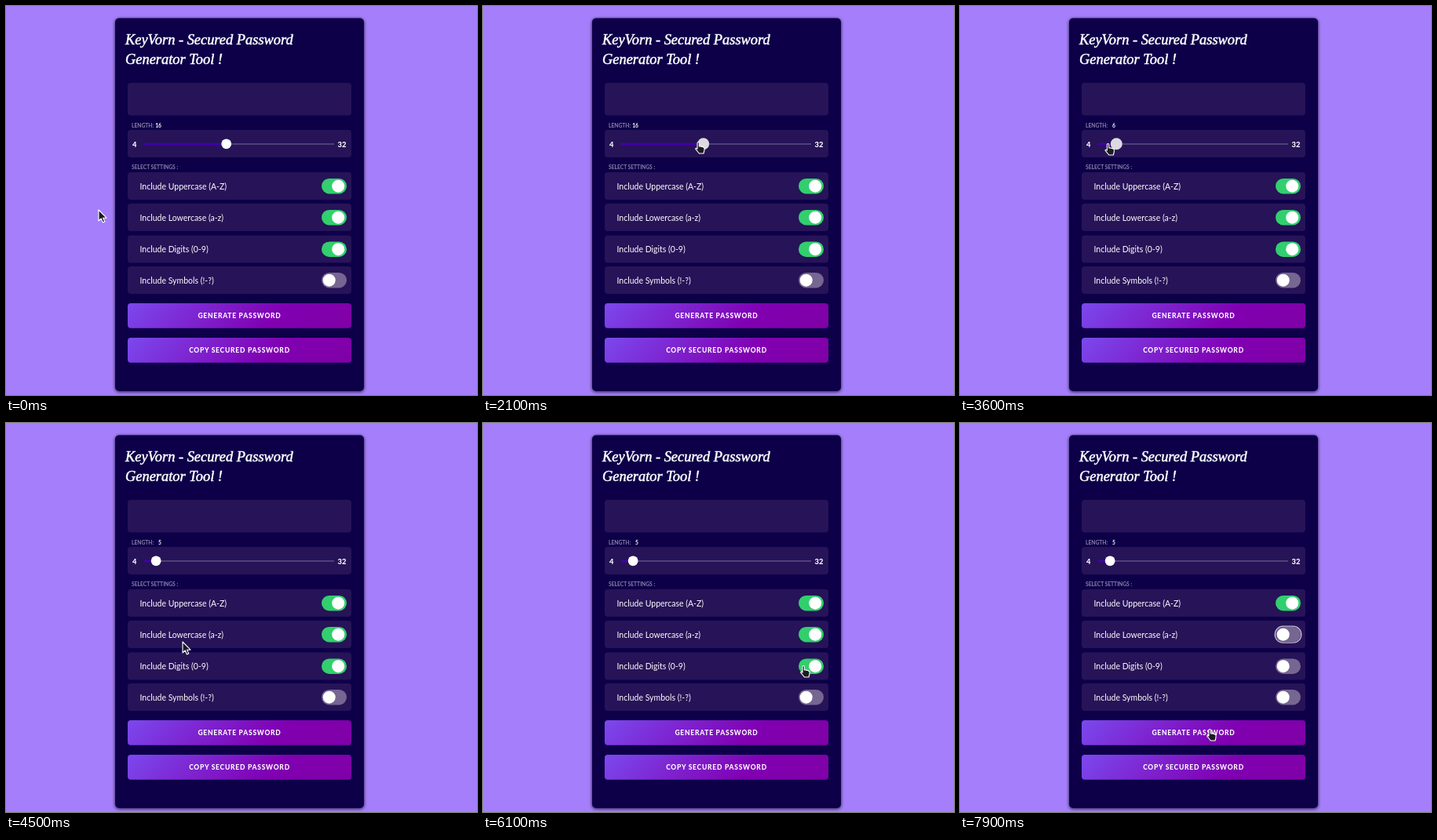
Animation, 600 px wide and 496 px high, one loop 8 s. Source, as an HTML page:

```html
<!DOCTYPE html>
<html lang="en">
<meta charset="utf-8">
<title>Password generator</title>
<style>
html, body { margin: 0; width: 100%; height: 100%; overflow: hidden; background: #a57ffb }
svg { display: block; width: 600px; height: 496px }
text { fill: #fff; font-family: Lato, "Open Sans", sans-serif; white-space: pre }
.title { font: italic 18.4px "Liberation Serif", serif; stroke: #fff; stroke-width: .5 }
.small { font-size: 6.7px; font-weight: 700; fill: #8d80a8 }
.label { font-size: 10.5px }
.bold { font-size: 9.3px; font-weight: 800 }
.button { font-size: 8.5px; font-weight: 800; letter-spacing: .75px; text-anchor: middle }
.panel { fill: #271358 }
.pointer { fill: #1c1c22; stroke: #fff; stroke-width: 1.1; stroke-linejoin: round }
</style>
<svg viewBox="0 0 600 496">
  <defs>
    <linearGradient id="violet" gradientUnits="userSpaceOnUse" x1="155" y1="0" x2="313.5" y2="158.5">
      <stop stop-color="#7b49ee"/><stop offset=".65" stop-color="#8000b2"/><stop offset="1" stop-color="#8000a6"/>
    </linearGradient>
    <filter id="shadow" x="-5%" y="-5%" width="110%" height="110%">
      <feDropShadow dx="0" dy="1" stdDeviation="2" flood-color="#000" flood-opacity=".8"/>
    </filter>
  </defs>
  <rect width="600" height="496" fill="#a57ffb"/>
  <rect x="139" y="15.5" width="317" height="475.5" rx="5" fill="#10004a" filter="url(#shadow)"/>
  <text class="title" x="152" y="49">KeyVorn - Secured Password</text>
  <text class="title" x="152" y="74">Generator Tool !</text>
  <rect class="panel" x="155" y="98" width="285" height="41.5" rx="4"/>
  <text class="small" x="160" y="154.5">LENGTH:</text>
  <text class="small" id="length" x="198" y="154.5" text-anchor="end" style="fill:#fff"></text>
  <rect class="panel" x="155" y="158" width="285" height="35" rx="4"/>
  <text class="bold" x="161" y="179.8">4</text>
  <text class="bold" x="422.5" y="179.8">32</text>
  <rect x="176" y="175.2" width="242" height="1.6" fill="#5b4a80"/>
  <rect id="fill" x="176" y="174.8" height="2.4" rx="1" fill="#4300ae"/>
  <circle id="thumb" cy="175.8"/>
  <text class="small" x="160" y="208.3">SELECT SETTINGS :</text>
  <g id="rows"></g>
  <g id="buttons"></g>
  <path id="arrow" class="pointer" d="M0 0V14L3.2 11L5.4 16L7.8 15L5.6 10.2H10Z"/>
  <path id="hand" class="pointer" d="M-1 0C-1-2 1.4-2 1.4 0V4L3.6 3.7L4.2 4.5L6 4.3L6.6 5.2L8 5.4V9L7 13H1.4L-3.2 7.4C-3.4 6-2.2 5.8-1 7.2Z"/>
</svg>
<script>
const $ = id => document.getElementById(id);
const clamp = x => Math.max(0, Math.min(1, x));
const mix = (a, b, p) => a + (b - a) * p;
const LOOP = 8000, FRAME = 100;

// label, top edge, switch-off time, time at which the focus ring goes
const settings = [
  ['Include Uppercase (A-Z)', 212],
  ['Include Lowercase (a-z)', 252, 7000, LOOP],
  ['Include Digits (0-9)', 292.5, 6200, 7000],
  ['Include Symbols (!-?)', 332, -1000, -1000]
];
// time, x, y of the pointer tip
const path = [
  [0, 118, 260], [700, 118, 260], [1400, 211, 181], [1900, 274, 175], [2200, 274, 175],
  [2800, 199, 178], [3400, 191, 177], [4000, 183, 177], [4100, 183, 177], [4500, 225, 279],
  [4700, 226, 281], [5600, 416, 302], [5800, 408, 311], [6200, 408, 311], [6600, 416, 274],
  [6800, 416, 270], [7000, 416, 270], [7700, 319, 390], [7900, 318, 392], [LOOP, 318, 392]
];
// value shown until the given time
const steps = [[2300, 16], [2400, 14], [2500, 12], [2600, 10], [2700, 8], [3500, 7], [3700, 6], [LOOP, 5]];

$('rows').innerHTML = settings.map(([name, y]) => `
  <rect class="panel" x="155" y="${y}" width="285" height="35" rx="4"/>
  <text class="label" x="170.5" y="${y + 21.7}">${name}</text>
  <rect class="ring" x="401.2" y="${y + 7.2}" width="33.6" height="21" rx="10.5" fill="none" stroke="#c4bdd2" stroke-width="1.3"/>
  <rect class="switch" x="402" y="${y + 8}" width="32" height="19.4" rx="9.7"/>
  <circle class="knob" cy="${y + 17.7}" r="8" fill="#fff"/>`).join('');

$('buttons').innerHTML = [['GENERATE PASSWORD', 379], ['COPY SECURED PASSWORD', 423]].map(([name, y]) => `
  <g transform="translate(0 ${y})">
    <rect x="155" width="285" height="31.7" rx="4" fill="url(#violet)"/>
    <text class="button" x="297.5" y="18.8">${name}</text>
  </g>`).join('');

const all = name => document.querySelectorAll('.' + name);
const rings = all('ring'), switches = all('switch'), knobs = all('knob');

function pointerAt(t) {
  const i = path.findIndex(k => k[0] > t);
  const [t0, x0, y0] = path[i - 1], [t1, x1, y1] = path[i];
  const p = (t - t0) / (t1 - t0);
  return [mix(x0, x1, p), mix(y0, y1, p)];
}

function draw(t) {
  const value = steps.find(s => t < s[0])[1];
  const x = 183 + (value - 4) / 28 * 228;
  const held = t >= 1900 && t < 4200;
  $('length').textContent = value;
  $('fill').setAttribute('width', x - 176);
  $('thumb').setAttribute('cx', x);
  $('thumb').setAttribute('r', held ? 7.5 : 6.4);
  $('thumb').setAttribute('fill', held ? '#dcdae0' : '#fff');

  settings.forEach(([, , off = Infinity, blur], i) => {
    const p = clamp((t - off) / 300);
    knobs[i].setAttribute('cx', mix(423.2, 411.7, p));
    switches[i].setAttribute('fill', `rgb(${mix(50, 117, p)},${mix(207, 102, p)},${mix(110, 146, p)})`);
    rings[i].style.display = t >= off && t < blur ? '' : 'none';
  });

  const [px, py] = pointerAt(t);
  const hand = held || t >= 5500 && t < 7200 || t >= 7500;
  for (const id of ['arrow', 'hand']) {
    $(id).setAttribute('transform', `translate(${px} ${py})`);
    $(id).style.display = (id === 'hand') === hand ? '' : 'none';
  }
}

function tick() {
  const t = performance.now() % LOOP;
  draw(Math.floor(t / FRAME) * FRAME);
  requestAnimationFrame(tick);
}
tick();
</script>
</html>
```
